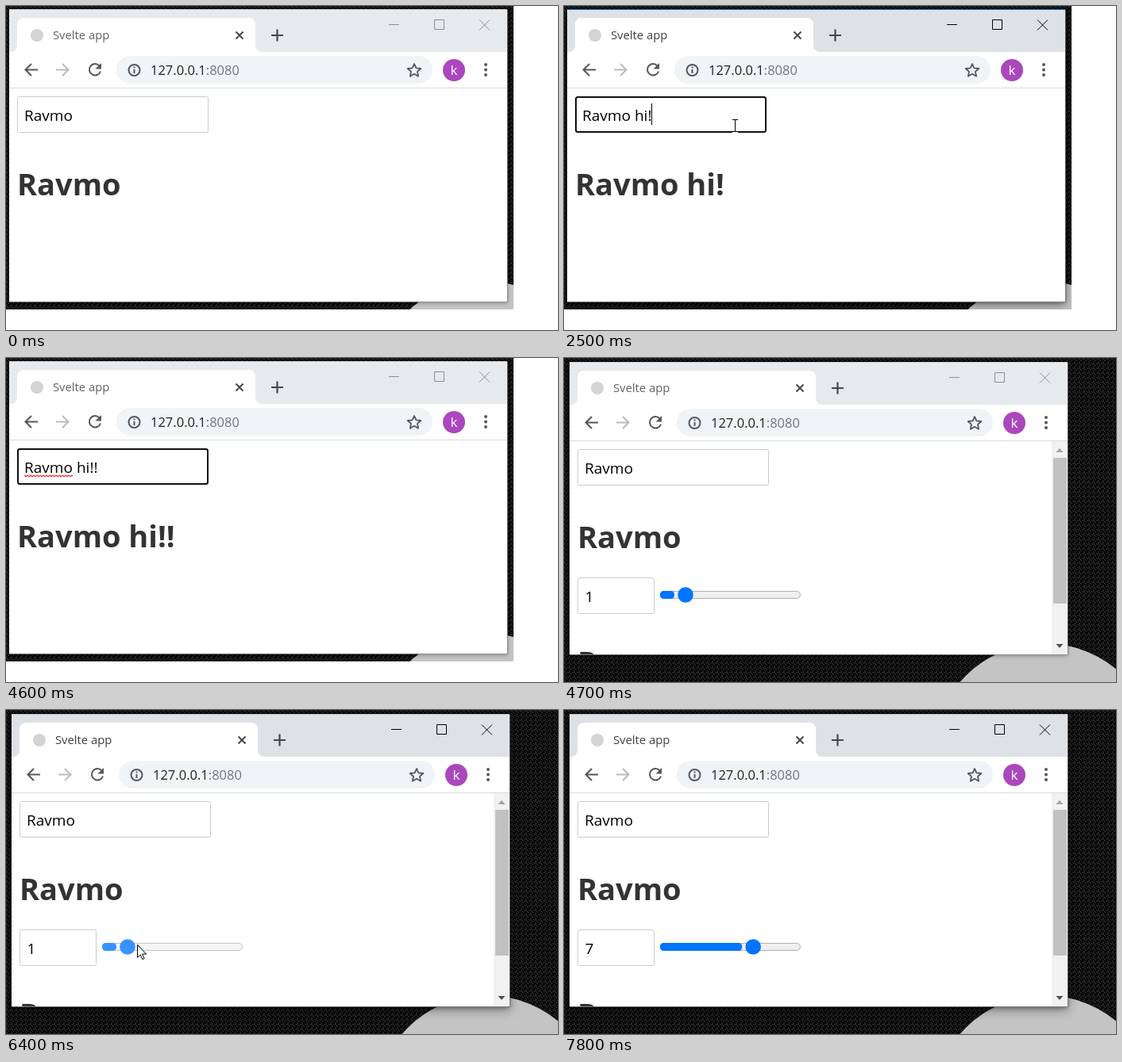
These frames come from a looping animation (695 by 409 pixels, 8000 ms). An HTML page:

```html
<!DOCTYPE html>
<html lang="en">
<head>
<meta charset="utf-8">
<title>Svelte app</title>
<style>
@property --v { syntax: "<number>"; inherits: true; initial-value: 1; }
html, body { margin: 0; width: 100%; height: 100%; overflow: hidden; background: #fff; }
svg.stage {
  display: block; width: 100vw; height: 100vh;
  font-family: "Open Sans", "Noto Sans", sans-serif;
}
.stage, .anim { animation: 8s step-end infinite; }
.stage { animation-name: active, value; }
.bar { fill: var(--bar); }
.ink { stroke: var(--ink); fill: none; }
.edge { stroke: var(--edge); }
.deep { opacity: var(--deep); }
.title { fill: var(--title); font-size: 14.8px; }
.icon { fill: none; stroke: #54585c; stroke-width: 2; }
.field { fill: #fff; stroke: #ccc; }
.input { font-size: 19px; fill: #000; }
.head { font-size: 38px; font-weight: 700; fill: #333; }

/* window focus */
@keyframes active {
  0%, 57.5% { --bar: #e7eaed; --ink: #8d9093; --title: #5f6367; --edge: #d4d7da; --deep: 0; }
  10% { --bar: #dee1e6; --ink: #000; --title: #3c4043; --edge: #1883d7; --deep: 1; }
  73.75%, 100% { --bar: #dee1e6; --ink: #000; --title: #3c4043; --edge: #c4c8cc; --deep: 1; }
}

/* scenes */
.one { animation-name: one; }
.two { animation-name: two; }
.window { animation-name: shift; }
.disc { animation-name: disc; }
@keyframes one { 0% { opacity: 1; } 58.75%, 100% { opacity: 0; } }
@keyframes two { 0% { opacity: 0; } 58.75%, 100% { opacity: 1; } }
@keyframes shift { 0% { transform: translate(0, 0); } 58.75%, 100% { transform: translate(3px, 1px); } }
@keyframes disc { 0% { transform: translate(-3px, -13px); } 58.75%, 100% { transform: translate(0, 0); } }

/* typing */
.focus { animation-name: focus; }
.k1 { animation-name: k1; }
.k2 { animation-name: k2; }
.k3 { animation-name: k3; }
.caret { animation-name: caret; }
@keyframes focus { 0%, 58.75%, 100% { opacity: 0; } 10% { opacity: 1; } }
@keyframes k1 { 0%, 58.75%, 100% { fill-opacity: 0; } 25% { fill-opacity: 1; } }
@keyframes k2 { 0%, 58.75%, 100% { fill-opacity: 0; } 31.25% { fill-opacity: 1; } }
@keyframes k3 { 0%, 58.75%, 100% { fill-opacity: 0; } 35% { fill-opacity: 1; } }
@keyframes caret {
  0% { opacity: 0; transform: translateX(88px); }
  10% { opacity: 1; }
  16.25% { opacity: 0; }
  22.5% { opacity: 1; }
  25% { transform: translateX(104px); }
  31.25% { transform: translateX(110px); }
  35% { opacity: 1; transform: translateX(116px); }
  41.25% { opacity: 0; }
  47.5% { opacity: 1; }
  53.75%, 100% { opacity: 0; transform: translateX(116px); }
}

/* slider */
.slider { animation-name: tint; }
.track { fill: var(--track); stroke: var(--line); }
.fill { fill: currentColor; width: calc(var(--v) * 14.2px + 3.8px); }
.thumb { fill: currentColor; transform: translateX(calc(var(--v) * 14.2px)); }
.digits { transform: translateY(calc(var(--v) * -40px)); }
@keyframes value {
  0% { --v: 1; }
  82.5% { --v: 2; }
  83.75% { --v: 3; }
  85% { --v: 4; }
  86.25% { --v: 5; }
  87.5% { --v: 6; }
  90%, 100% { --v: 7; }
}
@keyframes tint {
  0%, 93.75%, 100% { color: #0075ff; --track: #efefef; --line: #b2b2b2; }
  73.75% { color: #3793ff; --track: #f5f5f5; --line: #c6c6c6; }
  91.25% { color: #005cc8; --track: #e5e5e5; --line: #a0a0a0; }
}

/* pointers */
.arrow { animation-name: arrow; }
.beam { animation-name: beam; }
@keyframes arrow {
  0% { opacity: 0; transform: translate(560px, 118px); }
  1.25% { opacity: 1; transform: translate(560px, 118px); }
  2.5% { transform: translate(480px, 128px); }
  3.75% { transform: translate(397px, 145px); }
  5% { transform: translate(312px, 180px); }
  6.25% { transform: translate(228px, 208px); }
  7.5% { opacity: 0; }
  46.25% { opacity: 1; transform: translate(431px, 160px); }
  47.5% { transform: translate(427px, 138px); }
  48.75% { transform: translate(425px, 102px); }
  50% { opacity: 0; }
  52.5% { opacity: 1; transform: translate(570px, 12px); }
  53.75% { transform: translate(616px, 0); }
  55% { opacity: 0; }
  62.5% { opacity: 1; transform: translate(628px, 215px); }
  63.75% { transform: translate(500px, 188px); }
  65% { transform: translate(320px, 166px); }
  66.25% { opacity: 0; }
  68.75% { opacity: 1; transform: translate(171px, 346px); }
  70% { transform: translate(175px, 298px); }
  71.25% { transform: translate(145px, 277px); }
  72.5% { transform: translate(149px, 288px); }
  76.25% { transform: translate(154px, 292px); }
  77.5% { transform: translate(161px, 296px); }
  80% { transform: translate(165px, 296px); }
  82.5% { transform: translate(174px, 296px); }
  83.75% { transform: translate(188px, 296px); }
  85% { transform: translate(203px, 296px); }
  86.25% { transform: translate(217px, 296px); }
  87.5% { transform: translate(228px, 296px); }
  88.75% { transform: translate(232px, 296px); }
  90% { transform: translate(240px, 296px); }
  93.75% { transform: translate(300px, 240px); }
  95% { transform: translate(450px, 130px); }
  96.25% { transform: translate(622px, 15px); }
  97.5%, 100% { opacity: 0; transform: translate(622px, 15px); }
}
@keyframes beam {
  0% { opacity: 0; transform: translate(215px, 155px); }
  7.5% { opacity: 1; transform: translate(215px, 155px); }
  8.75% { transform: translate(215px, 151px); }
  46.25% { opacity: 0; }
  66.25% { opacity: 1; transform: translate(131px, 160px); }
  67.5% { transform: translate(91px, 230px); }
  68.75%, 100% { opacity: 0; transform: translate(91px, 230px); }
}
</style>
</head>
<body>
<svg class="stage" viewBox="0 0 695 409" preserveAspectRatio="none">
  <defs>
    <pattern id="weave" width="6" height="6" patternUnits="userSpaceOnUse">
      <rect width="6" height="6" fill="#040404"/>
      <path d="M0 0l4 4M3 -1l4 4M-1 3l3 3" stroke="#303030" stroke-width="1.1"/>
    </pattern>
    <pattern id="wave" x="23" y="147" width="4" height="4" patternUnits="userSpaceOnUse">
      <path d="M0 .8L2 2.8L4 .8" fill="none" stroke="#f00" stroke-width="1.1"/>
    </pattern>
    <clipPath id="page"><rect x="4" y="104" width="627" height="269"/></clipPath>
    <clipPath id="digit"><rect x="18" y="282" width="80" height="34"/></clipPath>
    <filter id="shade" x="-5%" y="-5%" width="110%" height="112%">
      <feDropShadow dx="0" dy="1" stdDeviation="2.5" flood-opacity=".4"/>
    </filter>
    <filter id="deep" x="-8%" y="-8%" width="116%" height="120%">
      <feDropShadow dx="0" dy="4" stdDeviation="7" flood-opacity=".4"/>
    </filter>
  </defs>

  <rect width="695" height="409" fill="url(#weave)"/>
  <circle class="anim disc" cx="605" cy="500" r="140" fill="#c4c4c4"/>

  <g class="anim window">
    <rect class="deep" x="4" y="5" width="627" height="368.5" filter="url(#deep)"/>
    <rect x="4" y="5" width="627" height="368.5" fill="#fff" filter="url(#shade)"/>
    <rect class="bar" x="4" y="5" width="627" height="53"/>
    <path class="edge" d="M4 4.5H631"/>
    <path d="M6 58a8 8 0 0 0 8-8V23a8 8 0 0 1 8-8H306a8 8 0 0 1 8 8V50a8 8 0 0 0 8 8z" fill="#fff"/>
    <circle cx="39" cy="37" r="8" fill="#d3d3d3"/>
    <text class="title" x="59" y="42">Svelte app</text>
    <path d="M289.5 32.5l9 9m0-9l-9 9" stroke="#44474a" stroke-width="2"/>
    <path d="M334 37h15M341.5 29.5v15" stroke="#44474a" stroke-width="2.2"/>
    <path class="ink" d="M482 23.5h13M539.5 17.5h12v12h-12zM596 17.5l13 13m0-13l-13 13"/>

    <path class="icon" d="M40 80.5H24.5M32 73l-7.5 7.5L32 88"/>
    <path class="icon" style="stroke:#b9bbbe" d="M63 80.5H78.5M71 73l7.5 7.5L71 88"/>
    <path class="icon" d="M117.5 75.5A7.2 7.2 0 1 0 119 82.5"/>
    <path d="M120 72v7.5h-7.5z" fill="#54585c"/>
    <rect x="139" y="63" width="398" height="35" rx="17.5" fill="#f0f4f6"/>
    <circle class="icon" cx="161.5" cy="81" r="7"/>
    <path class="icon" d="M161.5 76.5v2M161.5 80v5"/>
    <text x="182" y="87" font-size="16.5" fill="#202124">127.0.0.1<tspan fill="#70757a">:8080</tspan></text>
    <path class="icon" stroke-linejoin="round" style="stroke-width:1.8" d="M514 73l2.4 5.4 5.9.6-4.4 3.9 1.3 5.8-5.2-3-5.2 3 1.3-5.8-4.4-3.9 5.9-.6z"/>
    <circle cx="564" cy="81" r="14" fill="#ab47bc"/>
    <text x="564" y="87" font-size="17" fill="#fff" text-anchor="middle">k</text>
    <g fill="#54585c">
      <circle cx="604" cy="74" r="2"/><circle cx="604" cy="80.5" r="2"/><circle cx="604" cy="87" r="2"/>
    </g>
    <path d="M4 103.5H631" stroke="#dadce0"/>

    <rect class="field" x="14.5" y="114.5" width="240" height="45" rx="2"/>
    <rect class="anim focus" x="15" y="115" width="239" height="44" rx="2.5" fill="#fff" stroke="#101010" stroke-width="2"/>
    <text class="input" x="23" y="145">Ravmo<tspan class="anim k1"> hi</tspan><tspan class="anim k2">!</tspan><tspan class="anim k3">!</tspan></text>
    <rect class="anim k3" x="23" y="147" width="61" height="4" fill="url(#wave)"/>
    <rect class="anim caret" y="123" width="1" height="27"/>
    <text class="head" x="14" y="239">Ravmo<tspan class="anim k1"> hi</tspan><tspan class="anim k2">!</tspan><tspan class="anim k3">!</tspan></text>

    <g class="anim two" clip-path="url(#page)">
      <rect class="field" x="14.5" y="276.5" width="96" height="45" rx="2"/>
      <g clip-path="url(#digit)">
        <g class="digits input">
          <text x="23.5" y="347">1</text>
          <text x="23.5" y="387">2</text>
          <text x="23.5" y="427">3</text>
          <text x="23.5" y="467">4</text>
          <text x="23.5" y="507">5</text>
          <text x="23.5" y="547">6</text>
          <text x="23.5" y="587">7</text>
        </g>
      </g>
      <g class="anim slider">
        <rect class="track" x="118.5" y="293.5" width="176" height="9" rx="4.5"/>
        <rect class="fill" x="118" y="293" height="10" rx="4.5"/>
        <circle class="thumb" cx="135.8" cy="298" r="9.8"/>
      </g>
      <text class="head" x="14" y="397">Ravmo</text>
      <rect x="611" y="104" width="20" height="269" fill="#f1f1f1"/>
      <rect x="613" y="125" width="17" height="184" fill="#c1c1c1"/>
      <path d="M616.5 118l4.5-5 4.5 5z" fill="#a3a3a3"/>
      <path d="M616.5 360l4.5 5 4.5-5z" fill="#505050"/>
    </g>
    <path d="M4 373.5H631.5V5" fill="none" stroke="#777" stroke-opacity=".6"/>
  </g>

  <path class="anim one" d="M639 0H695V409H0V383H639z" fill="#fff"/>

  <path class="anim arrow" d="M.5 .5V16.5l3.7-3.5 2.5 5.7 2.4-1-2.5-5.6h5z" fill="#fff" stroke="#000"/>
  <g class="anim beam" fill="none">
    <path d="M-3-7.5H4M.5-7.5V7.5M-3 7.5H4" stroke="#fff" stroke-width="3"/>
    <path d="M-3-7.5H4M.5-7.5V7.5M-3 7.5H4" stroke="#000"/>
  </g>
</svg>
</body>
</html>
```
